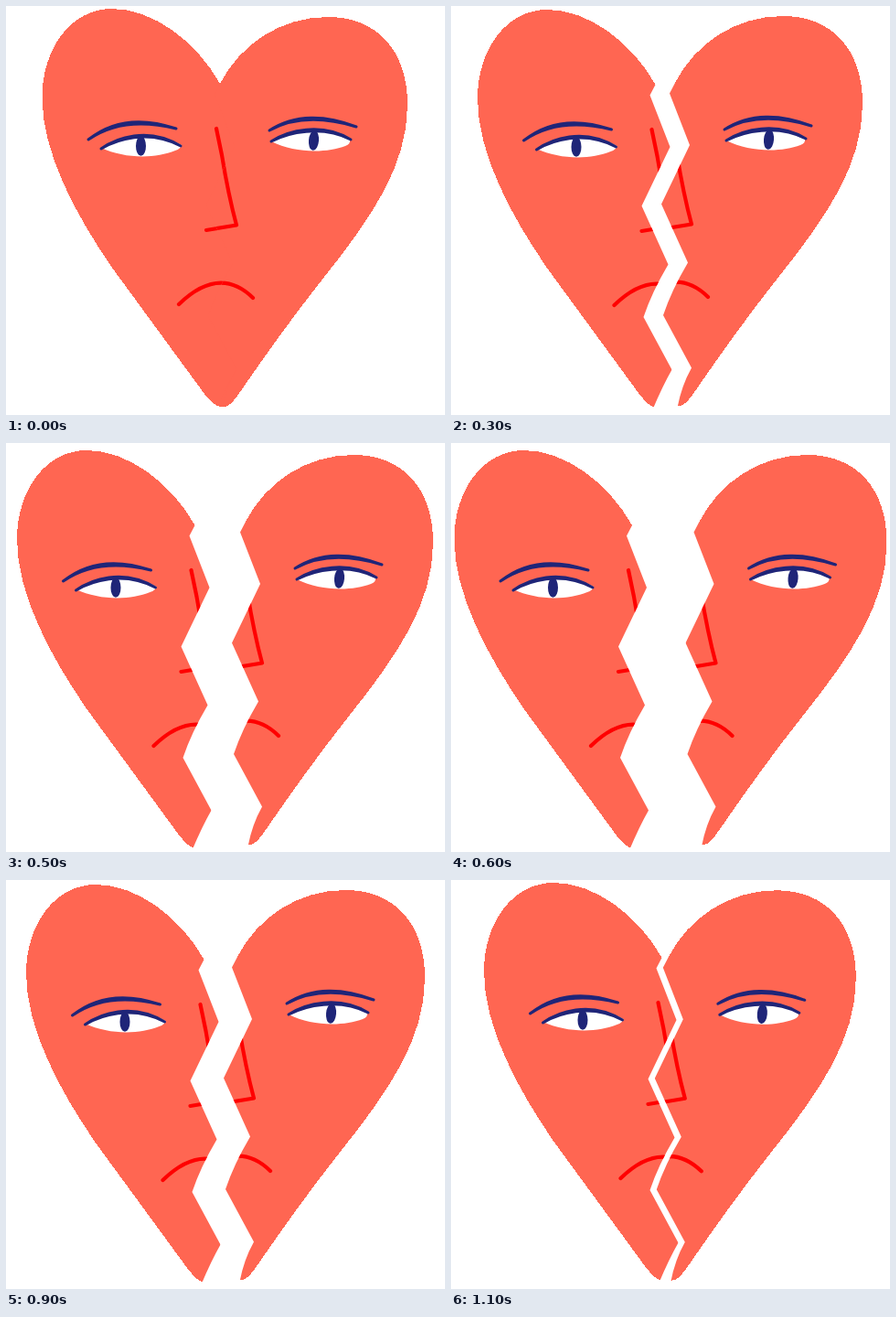
These frames come from a looping animation (480 px wide and 447 px high, 1.2 s). An HTML page:

```html
<!DOCTYPE html>
<html lang="en">
<head>
<meta charset="utf-8">
<title>Breaking heart</title>
<style>
  html, body { margin: 0; width: 100%; height: 100%; overflow: hidden; background: #fff; }
  svg { display: block; width: 100%; height: 100%; }
  .heart { fill: #ff6652; shape-rendering: crispEdges; }
  .white { fill: #fff; }
  .ink { fill: #1f2578; stroke: #1f2578; stroke-width: 3; stroke-linecap: round; stroke-linejoin: round; }
  .red { fill: none; stroke: #f00; stroke-width: 4.2; stroke-linecap: round; stroke-linejoin: round; }
</style>
</head>
<body>
<svg viewBox="0 0 480 447">
  <defs>
    <clipPath id="leftSide">
      <path d="M-60 -60H234V85L228 96.5L250 153L219 217.5L248 281.5Q230 312 221 339L252 396.5Q242 414 231 440V447H-60Z"/>
    </clipPath>
    <clipPath id="rightSide">
      <path d="M540 -60H234V85L228 96.5L250 153L219 217.5L248 281.5Q230 312 221 339L252 396.5Q241 416 236.5 440V447H540Z"/>
    </clipPath>
    <g id="face">
      <path class="heart" d="M234 85C208 38 160 3 116 3C70 3 39.5 48 39.5 100C39.5 160 76 228 116 286L217 424C223 431 229 438.5 237 438.5C245 438.5 250 430 256.5 421C288 375 318 334 346.5 298C399 232 439 175 439 108C439 48 405 12 352 12C300 12 256 42 234 85Z"/>

      <path class="white" d="M104 155C120 145 155 132 192 152Q191 156 185 158C163 167 130 167 104 155Z"/>
      <ellipse class="ink" cx="147.5" cy="153" rx="4" ry="9.2"/>
      <path class="ink" d="M104 156C120 144.5 155 131 191 153C155 134 120 146.5 104 156Z"/>
      <path class="ink" d="M90 146C118 123.5 152 122.500 186 134C152 125.500 118 126.500 90 146Z"/>

      <path class="white" d="M290 148C308 137 345 127 376 146Q377 151 371 153C350 161 316 161 290 148Z"/>
      <ellipse class="ink" cx="336.5" cy="147" rx="4" ry="9.2" transform="rotate(5 336.5 147)"/>
      <path class="ink" d="M290 148C308 136 345 126.500 377 146C345 129.500 308 138.500 290 148Z"/>
      <path class="ink" d="M288 136C316 117.500 350 119 383 132C350 122 316 120.500 288 136Z"/>

      <path class="red" d="M230 134L236 163Q243 206 252 239.500L219 245"/>
      <path class="red" d="M189 326C218 298 245 294.500 270 319"/>
    </g>
  </defs>
  <use id="whole" href="#face"/>
  <g id="left" clip-path="url(#leftSide)"><use href="#face"/></g>
  <g id="right" clip-path="url(#rightSide)"><use href="#face"/></g>
</svg>
<script>
  const LOOP = 1200;
  // Shift of each half: left x, left y, right x, right y
  const closed = [0, 0, 0, 0];
  const crack = [-3.5, 0, 3.8, -0.7];
  const narrow = [-10.5, 1, 11, -1];
  const middle = [-17.5, 2, 19, -1];
  const wide = [-27.5, 5, 28, 1];
  const open = [-36, 5, 37.5, 1];
  const steps = [
    [0, closed], [200, crack], [300, narrow], [400, middle], [500, wide],
    [600, open], [800, wide], [900, middle], [1000, narrow], [1100, crack]
  ];

  const [whole, left, right] = ['whole', 'left', 'right'].map(id => document.getElementById(id));
  const move = (el, x, y) => el.setAttribute('transform', `translate(${x} ${y})`);
  const start = performance.now();

  function draw() {
    const t = Math.max(0, performance.now() - start) % LOOP;
    const pose = steps.filter(([at]) => at <= t).pop()[1];
    move(left, pose[0], pose[1]);
    move(right, pose[2], pose[3]);
    whole.style.visibility = pose === closed ? 'visible' : 'hidden';
    requestAnimationFrame(draw);
  }
  draw();
</script>
</body>
</html>
```
